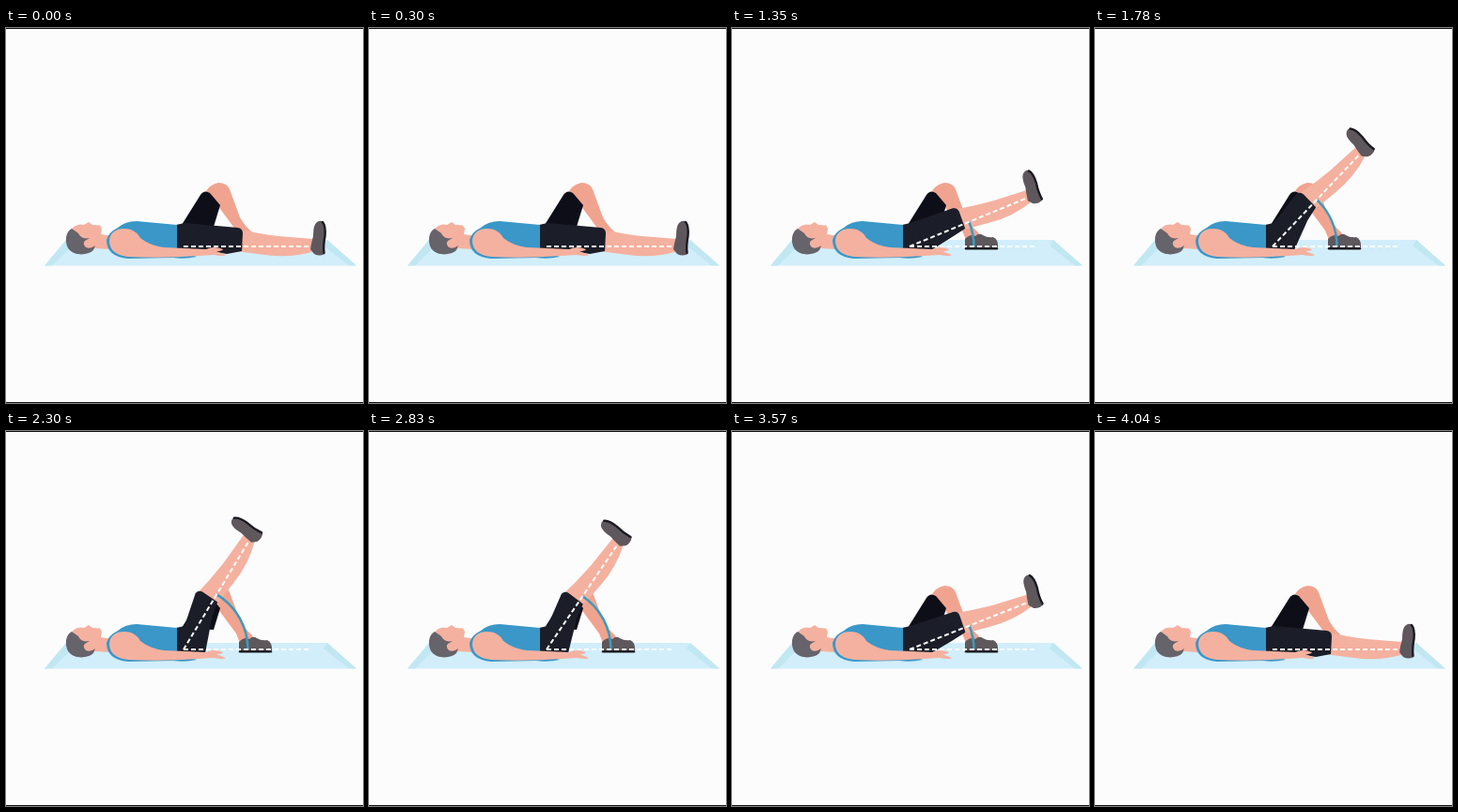
Recreate the animation shown at these times as an HTML page. Size 380 by 400 pixels, loop 4300 ms.

```html
<!DOCTYPE html>
<html lang="en">
<head>
<meta charset="utf-8">
<title>Straight leg raise</title>
<style>
  html, body { margin: 0; width: 100%; height: 100%; overflow: hidden; background: #fcfcfd; }
  svg { display: block; width: 100%; height: 100%; }
  .skin { fill: #f5b19f; }
  .shade { fill: #f0a48f; }
  .shirt { fill: #3a97c8; }
  .shorts { fill: #1b1e29; }
  .hair { fill: #66636b; }
  .shoe { fill: #5e585d; }
  .sole { fill: none; stroke: #1c1a22; stroke-width: 2.4; stroke-linecap: round; }
  .guide { fill: none; stroke: #fff; stroke-width: 2; stroke-dasharray: 5 3; }
  #arc { fill: none; stroke: #3d9abd; stroke-width: 2.6; }
</style>
</head>
<body>
<svg viewBox="0 0 380 400">
  <rect width="380" height="400" fill="#fcfcfd"/>
  <path d="M0 .5H380M0 399.5H380" stroke="#111"/>

  <!-- mat -->
  <path d="M64 226H342L373 253.5H41Z" fill="#d1eefa"/>
  <path d="M64 226L41 253.5H49L70 233ZM342 226L373 253.5H365L338 232Z" fill="#c1e7f3"/>

  <!-- bent leg -->
  <path class="shade" d="M212 176Q216 167 226 165Q235 165 238 172L249 202Q254 211 262 218L266 226H249L245 216L228 193Z"/>
  <path class="shoe" d="M248 234V225Q254 219 259 222Q263 218 267 221Q272 224 278 223Q284 226 283 234Z"/>
  <path class="sole" d="M249 235.3H282"/>
  <path fill="#0d0e17" d="M187 210L207 178Q211 172 217 176L228 189L221 212Z"/>

  <!-- raised leg -->
  <g id="leg">
    <path class="skin" d="M245 214Q266 219 290 222L327 225L329 238Q302 246 276 242Q260 240 245 238Z"/>
    <path class="shoe" d="M324 236Q325 229 327 222Q327 211 330 208Q334 204 338 207Q341 212 340 222Q338 232 339 241Q334 244 328 241Z"/>
    <path class="sole" d="M337 207Q340.5 211 339.5 222Q337.500 232 338.500 240"/>
  </g>
  <path id="thigh" class="shorts"/>

  <!-- head -->
  <path class="skin" d="M69 216Q74 208 83 210L88 207L92 210L100 210.500L102 214L101 220L114 222L110 236L95 235Q88 240 80 232Z"/>
  <path class="hair" d="M70 214C62 218 63 231 67 236C72 243 87 243 93 237L95 232Q90 236 85 234Q81 230 84 227L89 224Q80 226 77 219Z"/>

  <!-- torso and arm -->
  <path class="shirt" d="M107 226Q109 218 119 213Q127 206 139 206L182 210V236L203 244Q190 247 178 245L130 246Q107 244 107 226Z"/>
  <path class="skin" d="M110 228C110 216 121 212 133 215Q140 218 143 224Q153 232 168 234L213 236Q221 232 231 236Q230 238 224 238L234 242Q232 244 221 242L205 243Q165 246 130 244Q111 242 110 228Z"/>

  <path id="arc"/>
  <path class="guide" d="M189 233H323"/>
  <path id="ray" class="guide" d="M189 233H323"/>
</svg>
<script>
  const LOOP = 4300, HIP = [189, 233], ARC = 68.5, PEAK = 59;
  const [leg, thigh, arc, ray] = ["leg", "thigh", "arc", "ray"].map(id => document.getElementById(id));

  // Leg elevation in degrees
  function lift(t) {
    if (t < 1000) return 0;
    if (t < 2830) return Math.min(PEAK, (t - 952) * 0.0563);
    return Math.max(0, (4040 - t) * 0.0463);
  }

  // Point given relative to the hip, raised by the angle
  function raise(x, y, deg) {
    const a = deg * Math.PI / 180, c = Math.cos(a), s = Math.sin(a);
    return [HIP[0] + x * c + y * s, HIP[1] - x * s + y * c].map(v => v.toFixed(2)).join(" ");
  }

  function draw(now) {
    const deg = lift(now % LOOP);
    const turn = `rotate(${-deg} ${HIP})`;
    const at = (x, y) => raise(x, y, deg);
    leg.setAttribute("transform", turn);
    ray.setAttribute("transform", turn);
    thigh.setAttribute("d",
      `M181 210L190 208L${at(58, -20)}Q${at(63, -19)} ${at(63, -14)}L${at(62, 5)}L${at(46, 8)}L212 237L181 235Z`);
    arc.setAttribute("d", deg ? `M${raise(ARC, 0, 0)}A${ARC} ${ARC} 0 0 0 ${at(ARC, 0)}` : "");
    requestAnimationFrame(draw);
  }
  requestAnimationFrame(draw);
</script>
</body>
</html>
```
